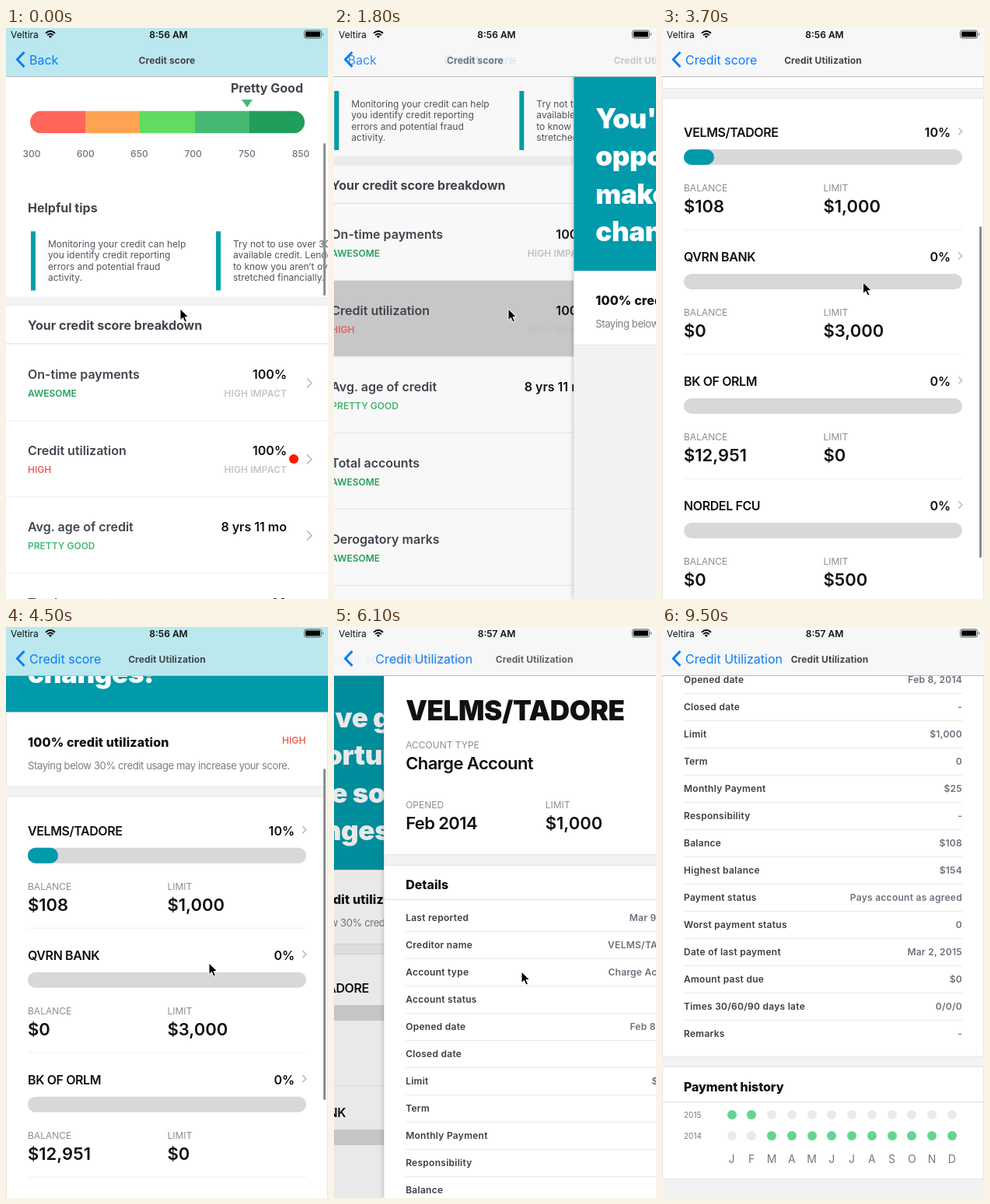
These frames come from a looping animation (414 px wide and 734 px high, 9.6 s). An HTML page:

```html
<!DOCTYPE html>
<html lang="en">
<head>
<meta charset="utf-8">
<title>Credit score</title>
<style>
html, body { margin: 0; width: 100%; height: 100%; overflow: hidden; background: #fff; }
body { position: relative; font-family: Inter, sans-serif; }
div { position: absolute; box-sizing: border-box; }
svg { position: absolute; left: 0; top: 0; overflow: visible; fill: none; }
.page { left: 0; top: 0; width: 414px; height: 734px; overflow: hidden; background: #f2f2f2; }
.scroll { left: 0; top: 0; width: 414px; }
.text { line-height: 20px; white-space: pre; }
.dim { inset: 0; background: #000; }
.bar { left: 408px; width: 3px; border-radius: 2px; background: #8e8e90; }
#nav { left: 0; top: 0; width: 414px; height: 62.5px; overflow: hidden;
  border-bottom: .5px solid #bbb; background: #f7f7f7; }
</style>
</head>
<body>
<script>
const TEAL = '#009aab', INK = '#41454d', BLACK = '#111', GREY = '#8d8d92', LINE = '#e6e6e8';
const GREEN = '#27a25f', MINT = '#48b873', RED = '#f0605a', BLUE = '#0d7bf5';
const BANK = 'VELMS/TADORE';

function add(parent, css, cls = '') {
  const el = document.createElement('div');
  el.style.cssText = css;
  el.className = cls;
  parent.append(el);
  return el;
}
// y is the middle of the capitals; align is l, r or c around x
function text(parent, x, y, str, size, weight, color, { align = 'l', ls = 0 } = {}) {
  const place = align === 'r' ? `right:${414 - x}px` : `left:${x}px`;
  const el = add(parent, `${place};top:${y - 10}px;font-size:${size}px;font-weight:${weight};color:${color};letter-spacing:${ls}px`, 'text');
  if (align === 'c') el.style.transform = 'translateX(-50%)';
  el.textContent = str;
  return el;
}
const box = (parent, x, y, w, h, color, extra = '') =>
  add(parent, `left:${x}px;top:${y}px;width:${w}px;height:${h}px;background:${color};${extra}`);
const card = (parent, y, h) => box(parent, 0, y, 414, h, '#fff', 'border:1px solid ' + LINE);
const svg = (parent, markup) => {
  const holder = add(parent, 'left:0;top:0');
  holder.innerHTML = `<svg width="1" height="1">${markup}</svg>`;
  return holder;
};
const chevron = (parent, x, y, r) =>
  svg(parent, `<path d="M${x - r / 2} ${y - r}l${r} ${r}l${-r} ${r}" stroke="#bcbcc2" stroke-width="1.6"/>`);

function makePage(barLength) {
  const root = add(document.body, '', 'page');
  return {
    root,
    body: add(root, '', 'scroll'),
    bar: add(root, `height:${barLength}px`, 'bar'),
    dim: add(root, '', 'dim'),
  };
}

// Score page
const score = makePage(196);
let p = score.body;
box(p, 0, 0, 414, 1100, '#fff');
text(p, 382, 77.5, 'Pretty Good', 16, 700, INK, { align: 'r' });
svg(p, `<path d="M303 92.500h14l-7 10z" fill="${MINT}"/>`);
const gauge = box(p, 31, 107, 353, 28.5, '#fff', 'border-radius:15px;overflow:hidden');
['#ff6558', '#ffa352', '#62db60', '#45b973', '#219d5c'].forEach((c, i) => box(gauge, i * 70.6, 0, 71, 29, c));
[300, 600, 650, 700, 750, 850].forEach((n, i) =>
  text(p, 33 + i * 69.2, 163, n, 12, 500, '#6b737d', { align: 'c' }));
text(p, 28, 231.5, 'Helpful tips', 16, 700, INK);
[
  ['Monitoring your credit can help', 'you identify credit reporting', 'errors and potential fraud', 'activity.'],
  ['Try not to use over 30% of your', 'available credit. Lenders like', 'to know you aren’t over-', 'stretched financially.'],
].forEach((lines, i) => {
  box(p, 32 + i * 238, 262, 6, 75.5, '#00a0a8');
  lines.forEach((line, j) => text(p, 54 + i * 238, 279 + j * 14.3, line, 12, 400, '#50545c'));
});
box(p, 0, 345.5, 414, 12, '#f2f2f2');
text(p, 28, 382.5, 'Your credit score breakdown', 16, 700, INK);
box(p, 0, 406, 414, 1, '#dedee0');
const pressed = box(p, 0, 504.5, 414, 98.5, '#cdcdce');
[
  ['On-time payments', '100%', 'AWESOME', GREEN, 'HIGH IMPACT'],
  ['Credit utilization', '100%', 'HIGH', RED, 'HIGH IMPACT'],
  ['Avg. age of credit', '8 yrs 11 mo', 'PRETTY GOOD', MINT, ''],
  ['Total accounts', '22', 'AWESOME', GREEN, ''],
  ['Derogatory marks', '0', 'AWESOME', GREEN, ''],
].forEach(([name, value, status, color, impact], i) => {
  const y = 446 + i * 98;
  text(p, 28, y, name, 16, 600, INK);
  text(p, 361, y, value, 16, 600, BLACK, { align: 'r' });
  text(p, 28, y + 24.5, status, 12, 600, color);
  text(p, 361, y + 24.5, impact, 12, 600, '#c3c5ca', { align: 'r', ls: .1 });
  chevron(p, 390, y + 11, 6);
  box(p, 0, y + 58.5, 414, 1, '#ececee');
});
svg(p, '<circle cx="370" cy="554.500" r="6" fill="#ff1a00"/>');

// Utilization page
const usage = makePage(426);
p = usage.body;
box(p, 0, 62, 414, 250, TEAL);
["You've got the", 'opportunity to', 'make some', 'changes!'].forEach((line, i) =>
  text(p, 28, 115.5 + i * 48.6, line, 35, 900, '#fff', { ls: -.4 }));
card(p, 312, 95.5);
text(p, 28, 350, '100% credit utilization', 16, 800, BLACK, { ls: .15 });
text(p, 385.5, 348, 'HIGH', 12, 600, RED, { align: 'r', ls: .1 });
text(p, 28, 379.5, 'Staying below 30% credit usage may increase your score.', 13, 400, '#7d7d82', { ls: -.37 });
const accounts = add(p, 'left:0;top:0;width:414px');
card(accounts, 420, 680);
[
  [BANK, 10, '$108', '$1,000'],
  ['QVRN BANK', 0, '$0', '$3,000'],
  ['BK OF ORLM', 0, '$12,951', '$0'],
  ['NORDEL FCU', 0, '$0', '$500'],
].forEach(([name, percent, balance, limit], i) => {
  const y = 464 + i * 160;
  text(accounts, 28, y, name, 16, 600, BLACK, { ls: -.4 });
  text(accounts, 371, y, percent + '%', 16, 600, BLACK, { align: 'r' });
  chevron(accounts, 383.5, y - 1, 4.5);
  box(accounts, 28, y + 21.5, 358, 20, '#d8d8d8', 'border-radius:10px');
  if (percent) box(accounts, 28, y + 21.5, 39, 20, TEAL, 'border-radius:10px');
  [['BALANCE', balance], ['LIMIT', limit]].forEach(([label, amount], j) => {
    text(accounts, 28 + j * 179.5, y + 71.5, label, 12, 400, GREY);
    text(accounts, 28 + j * 179.5, y + 94.5, amount, 22, 600, BLACK);
  });
  box(accounts, 28, y + 124.5, 358, 1, '#eee');
});

// Account page
const account = makePage(396);
p = account.body;
card(p, 60, 232.5);
text(p, 28, 107, BANK, 35, 900, BLACK, { ls: -.4 });
[
  [28, 152, 'ACCOUNT TYPE', 'Charge Account', -.6],
  [28, 229, 'OPENED', 'Feb 2014', -.6],
  [207.5, 229, 'LIMIT', '$1,000', 0],
].forEach(([x, y, label, value, ls]) => {
  text(p, x, y, label, 12, 400, GREY);
  text(p, x, y + 23, value, 22, 600, BLACK, { ls });
});
card(p, 305.5, 693);
text(p, 28, 330.5, 'Details', 16, 800, BLACK);
box(p, 0, 350, 414, 1, '#dedee0');
[
  ['Last reported', 'Mar 9, 2015'], ['Creditor name', BANK], ['Account type', 'Charge Account'],
  ['Account status', 'Open'], ['Opened date', 'Feb 8, 2014'], ['Closed date', '-'], ['Limit', '$1,000'],
  ['Term', '0'], ['Monthly Payment', '$25'], ['Responsibility', '-'], ['Balance', '$108'],
  ['Highest balance', '$154'], ['Payment status', 'Pays account as agreed'], ['Worst payment status', '0'],
  ['Date of last payment', 'Mar 2, 2015'], ['Amount past due', '$0'],
  ['Times 30/60/90 days late', '0/0/0'], ['Remarks', '-'],
].forEach(([label, value], i) => {
  const y = 373.5 + i * 35;
  text(p, 28, y, label, 12, 600, '#3a3d45', { ls: .27 });
  text(p, 386, y, value, 12, 600, '#69717b', { align: 'r', ls: .27 });
  if (i < 17) box(p, 28, y + 17, 358, 1, '#e9e9eb');
});
card(p, 1011, 145);
text(p, 28, 1036.5, 'Payment history', 16, 800, BLACK, { ls: -.1 });
box(p, 0, 1056, 414, 1, '#dedee0');
[2015, 2014].forEach((year, row) => {
  const y = 1073 + row * 27;
  text(p, 28, y, year, 10, 400, '#77777c');
  for (let m = 0; m < 12; m++) {
    const paid = row ? m > 1 : m < 2;
    box(p, 83.5 + m * 25.75, y - 6, 12, 12, paid ? '#65d594' : '#e8ebeb', 'border-radius:50%');
  }
});
[...'JFMAMJJASOND'].forEach((m, i) =>
  text(p, 89.5 + i * 25.75, 1130, m, 14, 400, '#77777c', { align: 'c' }));

// Navigation and status bars
const nav = add(document.body, '');
nav.id = 'nav';
const tint = box(nav, 0, 0, 414, 63, '#bae8ee');
const levels = [['Back', 'Credit score', 207], ['Credit score', 'Credit Utilization', 207], ['Credit Utilization', 'Credit Utilization', 215.5]]
  .map(([back, title, x]) => ({
    back: text(nav, 30, 40.5, back, 16, 400, BLUE),
    title: text(nav, x, 42, title, 12, 700, INK, { align: 'c', ls: .1 }),
  }));
svg(nav, `<path d="M23.500 31l-9 9.500l9 9.500" stroke="${BLUE}" stroke-width="3"/>`);
text(nav, 6, 8.5, 'Veltira', 12, 400, BLACK);
const clock = text(nav, 209, 8.5, '', 12, 600, BLACK, { align: 'c' });
svg(nav, `<path d="M51 6.800q6-5.600 12 0M53.200 9.200q3.800-3.400 7.600 0" stroke="#000" stroke-width="1.900"/>
  <path d="M57 13l-2.200-2.400q2.200-1.600 4.400 0z" fill="#000"/>
  <rect x="383.500" y="3" width="22" height="10" rx="2.500" stroke="#555"/>
  <rect x="385" y="4.500" width="19" height="7" rx="1.300" fill="#000"/>
  <path d="M407 6q2 2 0 4z" fill="#555"/>`);
const cursor = svg(document.body,
  '<path d="M0 0v14.500l3.400-3.100l2.500 5.600l2.500-1.100l-2.400-5.400h4.600z" fill="#000" stroke="#fff" stroke-width="1"/>');

const clamp = v => Math.min(1, Math.max(0, v));
const smooth = u => u * u * (3 - 2 * u);
// Eased path through [time, value] points
function track(t, ...keys) {
  let value = keys[0][1];
  for (let i = 1; i < keys.length; i++) {
    const [t0, v0] = keys[i - 1], [t1, v1] = keys[i];
    if (t >= t0) value = v0 + (v1 - v0) * smooth(clamp((t - t0) / (t1 - t0)));
  }
  return value;
}
function push(t, start) {
  const x = Math.max(0, t - start) / 54.8;
  return 1 - (1 + x) * Math.exp(-x);
}
function setPage(page, enter, leave, scroll, barY, barAlpha) {
  page.root.style.display = enter > .0001 && leave < .999 ? '' : 'none';
  page.root.style.transform = `translateX(${414 * (1 - enter) - 124 * leave}px)`;
  page.root.style.boxShadow = enter < .999 ? '0 0 6px rgba(0,0,0,.25)' : '';
  page.body.style.transform = `translateY(${-scroll}px)`;
  page.dim.style.opacity = leave * .1;
  page.bar.style.top = barY + 'px';
  page.bar.style.opacity = barAlpha;
}

function draw(t) {
  const p1 = push(t, 1747.5), p2 = push(t, 5918.5);
  const s1 = 181.5 * (1 - Math.exp(-t / 300));
  const s2 = track(t, [2428, 0], [3700, 330], [4097, 330], [5050, 0]);
  const s3 = track(t, [6750, 0], [7700, 450], [7950, 446]);
  setPage(score, 1, p1, s1, 148 + s1 * .29, track(t, [1200, 1], [1450, 0]));
  setPage(usage, p1, p2, s2, 65 + s2 * .577, track(t, [2400, 0], [2550, 1], [5200, 1], [5500, 0]));
  setPage(account, p2, 0, s3, 64 + s3 * .548, track(t, [6700, 0], [6850, 1], [8300, 1], [8600, 0]));
  pressed.style.opacity = t >= 1550 ? 1 : 0;
  accounts.style.display = t >= 2100 ? '' : 'none';
  clock.textContent = t < 5500 ? '8:56 AM' : '8:57 AM';

  // Share of the bar that has a teal header behind it
  tint.style.opacity = clamp(1 - s1 / 62) + clamp(s2 / 62) - clamp((s2 - 250) / 62);
  levels.forEach(({ back, title }, i) => {
    const d = p1 + p2 - i, alpha = clamp(1 - Math.abs(d));
    back.style.opacity = smooth(alpha);
    title.style.opacity = alpha;
    back.style.transform = `translateX(${-d * (d < 0 ? 150 : 49)}px)`;
    title.style.transform = `translateX(calc(-50% + ${-d * (d < 0 ? 272 : 100)}px))`;
  });

  const x = track(t, [1950, 224], [3100, 257], [4500, 261], [6000, 241], [6200, 241], [7100, 277]);
  const y = track(t, [1950, 361], [2450, 420], [3100, 327], [4000, 327], [4500, 432], [5000, 460],
    [5500, 443], [6200, 443], [6700, 470], [7100, 365]);
  cursor.style.transform = `translate(${x}px, ${y}px)`;
  cursor.style.display = t < 9000 ? '' : 'none';
}

function frame() {
  draw(performance.now() % 9600);
  requestAnimationFrame(frame);
}
frame();
</script>
</body>
</html>
```
